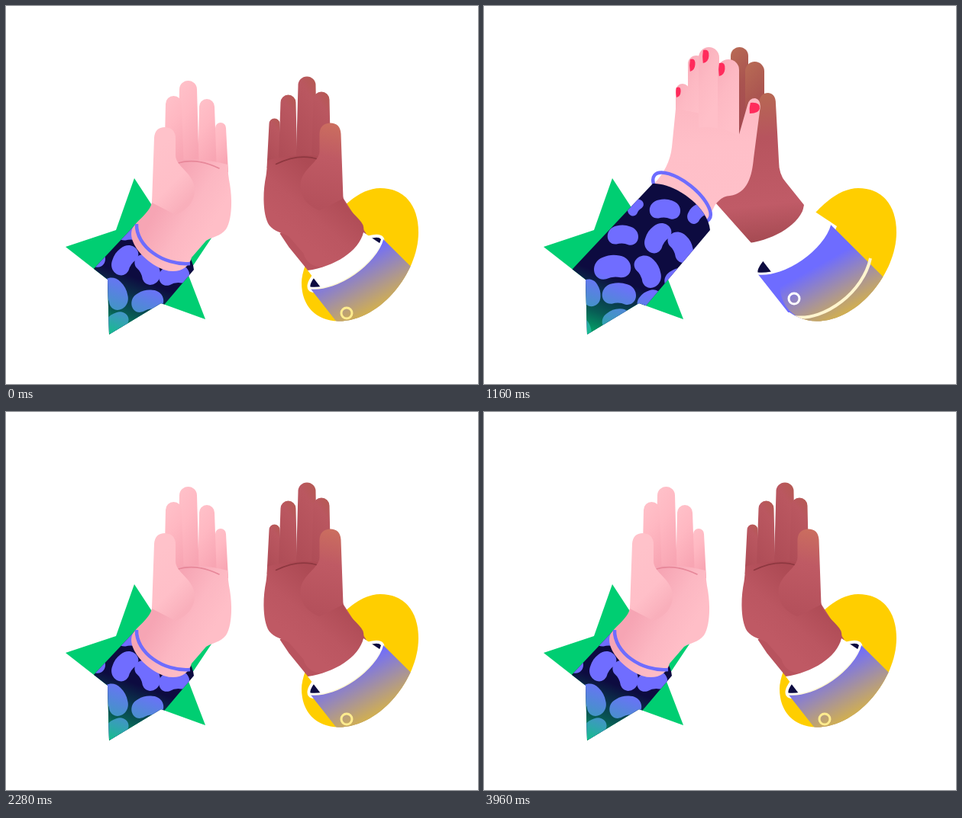
Recreate the animation shown at these times as an HTML page. Size 618 px wide and 496 px high, loop 4000 ms.

```html
<!DOCTYPE html>
<html lang="en">
<head>
<meta charset="utf-8">
<title>High five</title>
<style>
html, body { margin: 0; width: 100%; height: 100%; overflow: hidden; background: #fff; }
svg { display: block; width: 618px; height: 496px; }
</style>
</head>
<body>
<svg id="stage" viewBox="0 0 618 496"></svg>
<script>
const stage = document.getElementById('stage');
const LOOP = 4000, STEP = 40;

const STAR = 'M168 226L198 272L288 276L238 351L261 411L203 390L135 431L133 359L78 316L144 294Z';
const EGG = 'M490 239C522 239 540 262 540 297C540 350 490 413.5 435 413.5C406 413 387 394 387 363C387 330 440 239 490 239Z';
const CUFF = 'M366 322C402 326 452 290 461 257L605 401L508 502Z';

// Finger of the open hand: name, x, top, width
const FINGERS = [
  ['pinky', 274, 153, 14],
  ['ring', 253, 122, 20],
  ['middle', 227, 98, 23],
  ['index', 209, 118, 21]
];
const KNUCKLES = 218;

const gradient = (id, coords, stops, units = 'objectBoundingBox') => {
  const [x1, y1, x2, y2] = coords;
  return `<linearGradient id="${id}" gradientUnits="${units}" x1="${x1}" y1="${y1}" x2="${x2}" y2="${y2}">` +
    stops.map(([at, color, alpha = 1]) =>
      `<stop offset="${at}" stop-color="${color}" stop-opacity="${alpha}"/>`).join('') +
    '</linearGradient>';
};

const rounded = (x, y, w, h, fill) =>
  `<rect x="${x}" y="${y}" width="${w}" height="${h}" rx="${w / 2}" fill="${fill}"/>`;

// A finger that widens a little towards the palm
const finger = (x, y, w, fill) => {
  const r = w / 2;
  return `<path fill="${fill}" d="M${x - 2} ${KNUCKLES}L${x} ${y + r}A${r} ${r} 0 0 1 ${x + w} ${y + r}L${x + w + 3} ${KNUCKLES}Z"/>`;
};

const openHand = (skin, crease, wrist) => `
  ${wrist}
  <path fill="url(#${skin}Palm)" d="M222 208L250 205L290 206Q290 214 292 228C297 252 296 281 288 293
    C281 302 270 303 262 308L243 330C238 350 215 353 196 341C176 329 160 308 165 293
    C170 282 188 272 191 258L193 245Z"/>
  ${FINGERS.map(([name, x, y, w]) =>
    `<g id="${skin}-${name}">${finger(x, y, w, `url(#${skin}Finger)`)}</g>`).join('')}
  <path fill="url(#${skin}Palm)" d="M220 203Q250 198 290 208L291 225L230 245Z"/>
  <path fill="none" stroke="${crease}" stroke-width="1.6" stroke-linecap="round" d="M223 207Q248 198 279 213"/>
  <g id="${skin}-thumb"><path fill="url(#${skin}Thumb)" d="M191 258L194 173Q195 159 208 159Q222 160 222 174
    L222 196C222 211 246 219 247 240C247 259 236 268 222 274Z"/></g>`;

const nail = (x, y, w, h, tilt = 4) =>
  `<path transform="translate(${x} ${y}) rotate(${tilt})" fill="#ff2b5c"
    d="M0 1Q${w} -2 ${w} ${h * .45}Q${w} ${h * .9} 1 ${h}Q-1 ${h / 2} 0 1Z"/>`;

// Blobs on the patterned sleeve: x, y, half width, tilt
const BLOBS = [
  [198, 244, 12, -50], [237, 247, 20, 3], [279, 252, 15, -45], [182, 281, 20, 3],
  [227, 284, 21, -55], [258, 296, 21, 62], [168, 323, 24, -6], [215, 328, 22, 62],
  [177, 358, 22, 3], [140, 356, 18, 75], [173, 391, 19, -20], [216, 366, 17, -35],
  [126, 401, 18, 55], [257, 338, 21, -12], [292, 304, 20, -10]
];
const blob = ([x, y, r, tilt]) =>
  `<path transform="translate(${x} ${y}) rotate(${tilt}) scale(${r / 20})" fill="#706dff"
    d="M-9 -12C-3 -14 3 -14 9 -12C25 -8 23 14 8 12Q0 9 -8 12C-23 14 -25 -8 -9 -12Z"/>`;

stage.innerHTML = `
<defs>
  ${gradient('pinkPalm', [222, 225, 285, 262], [[0, '#f6a5b4'], [.55, '#fcb7c2'], [1, '#ffbec7']], 'userSpaceOnUse')}
  ${gradient('pinkFinger', [0, 0, .35, 1], [[0, '#ffc2ca'], [.45, '#ffb8c2'], [1, '#f8a5b3']])}
  ${gradient('pinkThumb', [195, 190, 250, 245], [[0, '#ffc2ca'], [.6, '#ffbfc8'], [1, '#f9afbb']], 'userSpaceOnUse')}
  ${gradient('pinkBack', [0, 0, .3, .8], [[0, '#f8adba'], [.5, '#fdb9c3'], [1, '#ffbfc8']])}
  ${gradient('pinkWrist', [290, 110, 300, 240], [[0, '#fdb8c2'], [.4, '#ffbfc8'], [1, '#ffc0c9']], 'userSpaceOnUse')}
  ${gradient('brownPalm', [222, 225, 275, 285], [[0, '#ad4a54'], [.6, '#bb5661'], [1, '#bf5964']], 'userSpaceOnUse')}
  ${gradient('brownFinger', [0, 0, .35, 1], [[0, '#b45a50'], [.3, '#ba5760'], [1, '#af4d57']])}
  ${gradient('brownThumb', [200, 160, 225, 270], [[0, '#cb6e5f'], [.4, '#bf5a64'], [1, '#b4505b']], 'userSpaceOnUse')}
  ${gradient('brownBack', [0, 0, .2, 1], [[0, '#b96c55'], [.5, '#a95350'], [1, '#a44b52']])}
  ${gradient('brownSide', [365, 96, 385, 290], [[0, '#b76853'], [.3, '#b7545e'], [.75, '#c05b67'], [1, '#a54a52']], 'userSpaceOnUse')}
  ${gradient('greenFade', [141, 435, 171, 357], [[0, '#00ce72', .85], [.4, '#00ce72', .42], [1, '#00ce72', 0]], 'userSpaceOnUse')}
  ${gradient('yellowFade', [484, 406, 445, 336], [[0, '#ffce00', .75], [.45, '#ffce00', .42], [1, '#ffce00', 0]], 'userSpaceOnUse')}
  <clipPath id="starClip"><path d="${STAR}"/></clipPath>
  <clipPath id="eggClip"><path d="${EGG}"/></clipPath>
  <clipPath id="sleeveClip"><path d="M0 0H400V411H261L203 390L135 431L133 359L78 316L0 255Z"/></clipPath>
  <clipPath id="cuffClip"><path d="M200 0H618V297H540C540 350 490 413.5 435 413.5Q415 413 400 402L320 402Z"/></clipPath>
  <clipPath id="clothClip"><path id="cloth" d="M221 213C250 212 293 243 296 274L105 500L-20 470Z"/></clipPath>
  <clipPath id="fadeClip"><path id="fadeShape" d="${CUFF}"/></clipPath>
</defs>
<path d="${STAR}" fill="#00ce72"/>
<path d="${EGG}" fill="#ffce00"/>

<g clip-path="url(#cuffClip)"><g id="opening">
  <ellipse cx="413" cy="290" rx="58" ry="17" transform="rotate(-35 413 290)" fill="#0d0b40" stroke="#fff" stroke-width="4"/>
</g></g>
<g id="brownClap">
  ${rounded(323, 36, 23, 120, 'url(#brownBack)')}
  ${rounded(342, 55, 25, 130, 'url(#brownBack)')}
  <path fill="url(#brownSide)" d="M360 108Q362 96 372 96Q382 97 382 110L386 185Q386 203 395 213L419 243
    Q414 275 380 297L350 293L303 240L330 200L345 140Z"/>
</g>
<g id="brownOpen"><g transform="translate(632.5 -5.5) scale(-1 1)">
  ${openHand('brown', '#8e3840', '<path fill="#b8535e" d="M192 256L161 304Q176 356 236 354L262 322L274 304Z"/>')}
</g></g>
<path id="shirt" fill="#fff" d="M347 293C382 288 414 268 420 243L462 271L440 325L383 340Z"/>
<g clip-path="url(#cuffClip)"><g id="cuff">
  <path fill="#6e6cff" d="${CUFF}"/>
  <path fill="none" stroke="#fff" stroke-width="3" d="M366 322C402 326 452 290 461 257"/>
</g></g>
<g clip-path="url(#eggClip)"><g clip-path="url(#fadeClip)">
  <rect x="380" y="235" width="165" height="182" fill="url(#yellowFade)"/>
</g></g>
<g clip-path="url(#cuffClip)"><g id="trim" fill="none">
  <path stroke="#fff5cf" stroke-width="4" d="M414 379C455 385 505 345 514 302"/>
  <circle id="button" cx="414" cy="355" r="7" stroke-width="3"/>
</g></g>

<g id="pinkClap">
  ${rounded(251, 82, 18, 90, 'url(#pinkBack)')}
  ${rounded(267, 45, 22, 110, 'url(#pinkBack)')}
  <path fill="url(#pinkWrist)" d="M251 115L246 165Q243 192 222 214L290 268L302 242Q311 229 322 229
    C345 226 351 203 353 180L361 118Q364 103 355 101Q347 101 345 110L333 152L333 130Z"/>
  ${rounded(281, 34, 27, 125, 'url(#pinkBack)')}
  ${rounded(306, 50, 28, 125, 'url(#pinkBack)')}
  <path fill="url(#pinkWrist)" d="M250 150Q290 128 334 150L340 185L246 185Z"/>
  ${nail(252, 86, 6, 14)}${nail(270, 49, 7, 17)}${nail(287, 37, 8, 18)}${nail(308, 54, 8, 18)}${nail(349, 106, 13, 15, 8)}
  <ellipse cx="259" cy="231" rx="46" ry="19" transform="rotate(39 259 231)" fill="none" stroke="#6e6cff" stroke-width="4.5"/>
</g>
<g clip-path="url(#sleeveClip)"><g clip-path="url(#clothClip)">
  <path fill="#0d0b40" d="M0 150H400V496H0Z"/>
  <g id="pattern">${BLOBS.map(blob).join('')}</g>
</g></g>
<g clip-path="url(#starClip)"><rect x="75" y="225" width="215" height="210" fill="url(#greenFade)"/></g>
<g id="pinkOpen">
  ${openHand('pink', '#e78799', '')}
  <path fill="none" stroke="#6e6cff" stroke-width="4.5" d="M171 286C170 315 206 341 241 338"/>
</g>

<g id="confetti">
  <circle r="13" fill="#00ce72"/>
  <circle r="8" fill="#ff2b5c"/>
  <rect x="-10.5" y="-4.5" width="21" height="9" rx="4.5" fill="#ff2b5c"/>
  <circle r="11" fill="#ffce00"/>
</g>`;

const el = id => document.getElementById(id);
const mix = (a, b, k) => a + (b - a) * k;

// Value at time t from [time, value] keys, eased in and out
function keyed(t, keys) {
  if (t <= keys[0][0]) return keys[0][1];
  for (let i = 1; i < keys.length; i++) {
    const [t0, v0] = keys[i - 1], [t1, v1] = keys[i];
    if (t <= t1) {
      const k = (t - t0) / (t1 - t0);
      return mix(v0, v1, k * k * (3 - 2 * k));
    }
  }
  return keys[keys.length - 1][1];
}

const MEET = [[0, 0], [140, -.1], [440, 1], [1240, 1], [1560, -.06], [1720, 0]];
const LIFT = [[400, 16], [550, -9], [600, 0], [740, 24], [880, 20]];

// Sideways travel of each fingertip in pixels; brown has one value per gesture
const SWAY = {
  pink: { thumb: 5, index: 4, middle: 3, ring: 2, pinky: 0 },
  brown: { thumb: [9, -3], index: [7, 0], middle: [8, -1], ring: [2, 2], pinky: [2, 4] }
};
const REACH = { thumb: 96, index: 97, middle: 117, ring: 93, pinky: 62 };
const PIVOT = { thumb: [200, 256], index: [221, 215], middle: [239, 215], ring: [263, 215], pinky: [281, 216] };

const CONFETTI = [[203, 72, 0], [201, 136, 0], [436, 93, 12], [447, 153, 0]];

const move = (id, x, y) => el(id).setAttribute('transform', `translate(${x} ${y})`);
const show = (id, on) => el(id).setAttribute('visibility', on ? 'visible' : 'hidden');

function turn(id, x, y, axis, width) {
  el(id).setAttribute('transform', `translate(${x + axis} ${y}) scale(${width} 1) translate(${-axis} 0)`);
}

function bend(skin, name, dx) {
  const angle = Math.atan(dx / REACH[name]) * 180 / Math.PI;
  el(`${skin}-${name}`).setAttribute('transform', `rotate(${angle} ${PIVOT[name].join(' ')})`);
}

function draw(t) {
  const meet = keyed(t, MEET), apart = 1 - meet;
  const lift = keyed(t, LIFT), drop = lift / 20;
  const clapped = meet >= .5;
  const openWidth = 1 - 1.1 * Math.max(0, meet);
  const clapWidth = 1 - 1.1 * Math.max(0, apart);

  for (const skin of ['pink', 'brown']) {
    show(skin + 'Open', !clapped);
    show(skin + 'Clap', clapped);
  }
  turn('pinkOpen', 50 * meet, (lift - 72) * meet, 235, openWidth);
  turn('brownOpen', -48 * meet, (lift - 54) * meet, 400, openWidth);
  turn('pinkClap', -50 * apart, mix(72, lift, meet), 280, clapWidth);
  turn('brownClap', 48 * apart, mix(54, lift * .9, meet), 370, clapWidth);
  move('cloth', -50 * apart, mix(72, lift, meet));
  move('pattern', -72 * apart, mix(49, lift, meet));
  move('shirt', 48 * apart, mix(54, lift * .9, meet));
  for (const id of ['opening', 'cuff', 'fadeShape', 'trim']) {
    move(id, mix(32, -8 * drop, meet), mix(48, 29 * drop, meet));
  }
  el('button').setAttribute('stroke', clapped ? '#fff' : '#ffec8f');

  const settle = keyed(t, [[1400, 0], [1680, 1.6], [1800, 1], [2040, 0]]);
  const curl = keyed(t, [[2440, 0], [2780, 1], [2840, 1], [3120, 0]]);
  const fan = keyed(t, [[3040, 0], [3380, 1], [3440, 1], [3800, 0]]);
  for (const name in REACH) {
    const [inward, outward] = SWAY.brown[name];
    bend('pink', name, SWAY.pink[name] * settle);
    bend('brown', name, inward * curl + outward * fan);
  }

  const burst = (t - 420) / 560;
  show('confetti', burst > 0 && burst < 1);
  const spread = 1.18 * (1 - Math.pow(1 - Math.min(1, Math.max(0, burst)), 4.87));
  const size = keyed(t, [[420, .2], [560, 1], [680, 1], [980, 0]]);
  CONFETTI.forEach(([x, y, tilt], i) => {
    el('confetti').children[i].setAttribute('transform',
      `translate(${mix(318, x, spread)} ${mix(140, y, spread)}) rotate(${tilt}) scale(${size})`);
  });
}

const start = performance.now();
function tick() {
  const t = (performance.now() - start) % LOOP;
  draw(Math.floor(t / STEP) * STEP);
  requestAnimationFrame(tick);
}
draw(0);
requestAnimationFrame(tick);
</script>
</body>
</html>
```
